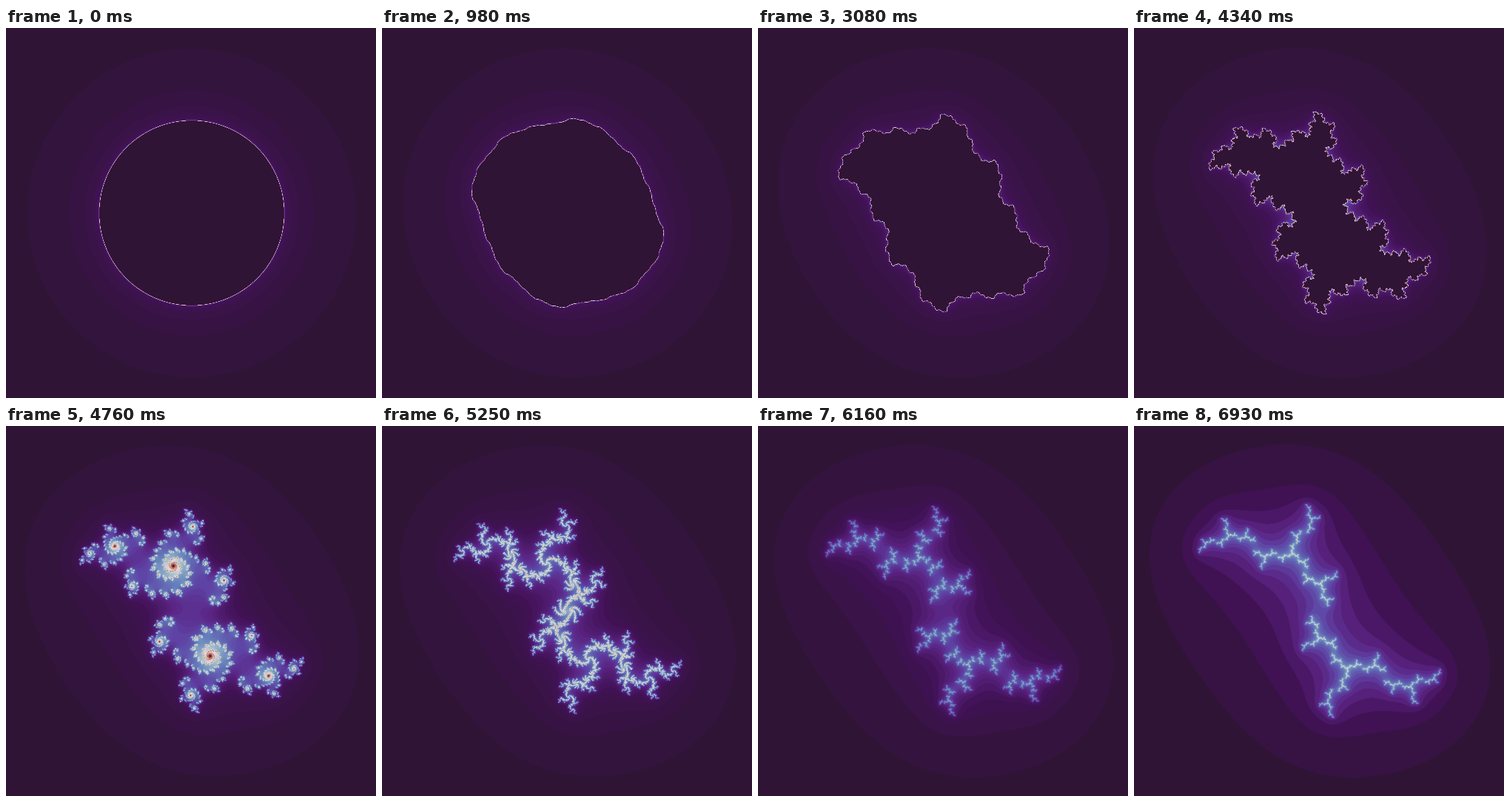
An HTML page with a canvas for the animation above (7000 ms loop, 500 by 500 pixels).

```html
<!DOCTYPE html>
<html>
<head>
<meta charset="utf-8">
<title>Julia set</title>
<style>
  html, body { margin: 0; width: 100%; height: 100%; overflow: hidden; background: #2f1436; }
  canvas { display: block; width: 100vw; height: 100vh; }
</style>
</head>
<body>
<canvas width="500" height="500"></canvas>
<script>
const SIZE = 500, FRAMES = 100, FRAME_MS = 70;
const GRID = 1008, HALF = GRID / 2, SAMPLES_PER_UNIT = 250;
const MAX_ITER = 100, MIN_ITER = 2, ESCAPE_SQ = 100;
const CENTER_X = 251, CENTER_Y = 250;
const OUTER = 0.0732, INNER = 0.4268; // Hann weights for halving the grid

const ctx = document.querySelector('canvas').getContext('2d');
const image = ctx.createImageData(SIZE, SIZE);
const pixels = new Uint32Array(image.data.buffer);
const counts = new Uint8Array(GRID * GRID);
const column = new Float32Array(GRID);

// Cyclic twilight palette: position, colour
const stops = [
  [0, 0x2f1436], [1 / 18, 0x421257], [2 / 18, 0x5a2382], [3 / 18, 0x5e43a5],
  [5 / 18, 0x6785be], [7 / 18, 0x9ebbc9], [9 / 18, 0xe2d9e2], [11 / 18, 0xceac94],
  [13 / 18, 0xba6657], [15 / 18, 0x8e2c50], [17 / 18, 0x471340], [1, 0x2f1436]
];
const palette = Uint32Array.from({ length: 256 }, (_, i) => {
  const t = i / 255;
  const k = Math.max(1, stops.findIndex(s => s[0] >= t));
  const [t0, a] = stops[k - 1], [t1, b] = stops[k];
  const mix = shift => {
    const from = a >> shift & 255, to = b >> shift & 255;
    return Math.round(from + (to - from) * (t - t0) / (t1 - t0));
  };
  return (255 << 24 | mix(0) << 16 | mix(8) << 8 | mix(16)) >>> 0;
});

// Fills the grid with escape counts for z² + i·ci and returns the largest
function iterate(ci) {
  const mod = Math.hypot(1, 4 * ci);
  const ax = (1 - Math.sqrt((mod + 1) / 2)) / 2;
  const ay = Math.sqrt((mod - 1) / 2) / 2;
  const basin = Math.max(0, 1 - 2 * Math.hypot(ax, ay)); // safely attracted radius
  const basinSq = basin * basin;
  let highest = 0;
  for (let row = 0; row < HALF; row++) {
    const y0 = (HALF - row - 0.5) / SAMPLES_PER_UNIT;
    for (let col = 0; col < GRID; col++) {
      let x = (col - HALF + 0.5) / SAMPLES_PER_UNIT, y = y0, n = 0;
      while (n < MAX_ITER) {
        const xx = x * x, yy = y * y;
        if (xx + yy > ESCAPE_SQ) break;
        const dx = x - ax, dy = y - ay;
        if (dx * dx + dy * dy < basinSq) { n = MAX_ITER; break; }
        y = 2 * x * y + ci;
        x = xx - yy;
        n++;
      }
      const at = row * GRID + col;
      counts[at] = counts[counts.length - 1 - at] = n; // symmetric under z → -z
      if (n > highest) highest = n;
    }
  }
  return highest;
}

function draw(frame) {
  const scale = 255 / (iterate(frame / 100) - MIN_ITER);
  for (let py = 0; py < SIZE; py++) {
    const top = ((py - CENTER_Y) * 2 + HALF - 1) * GRID;
    for (let i = 0; i < GRID; i++) {
      const at = top + i;
      column[i] = OUTER * (counts[at] + counts[at + 3 * GRID])
                + INNER * (counts[at + GRID] + counts[at + 2 * GRID]);
    }
    for (let px = 0; px < SIZE; px++) {
      const i = (px - CENTER_X) * 2 + HALF - 1;
      const n = OUTER * (column[i] + column[i + 3]) + INNER * (column[i + 1] + column[i + 2]);
      pixels[py * SIZE + px] = palette[Math.max(0, Math.min(255, Math.round((n - MIN_ITER) * scale)))];
    }
  }
  ctx.putImageData(image, 0, 0);
}

let shown = -1;
function tick() {
  const frame = Math.floor(performance.now() / FRAME_MS) % FRAMES;
  if (frame !== shown) draw(shown = frame);
  requestAnimationFrame(tick);
}
tick();
</script>
</body>
</html>
```
